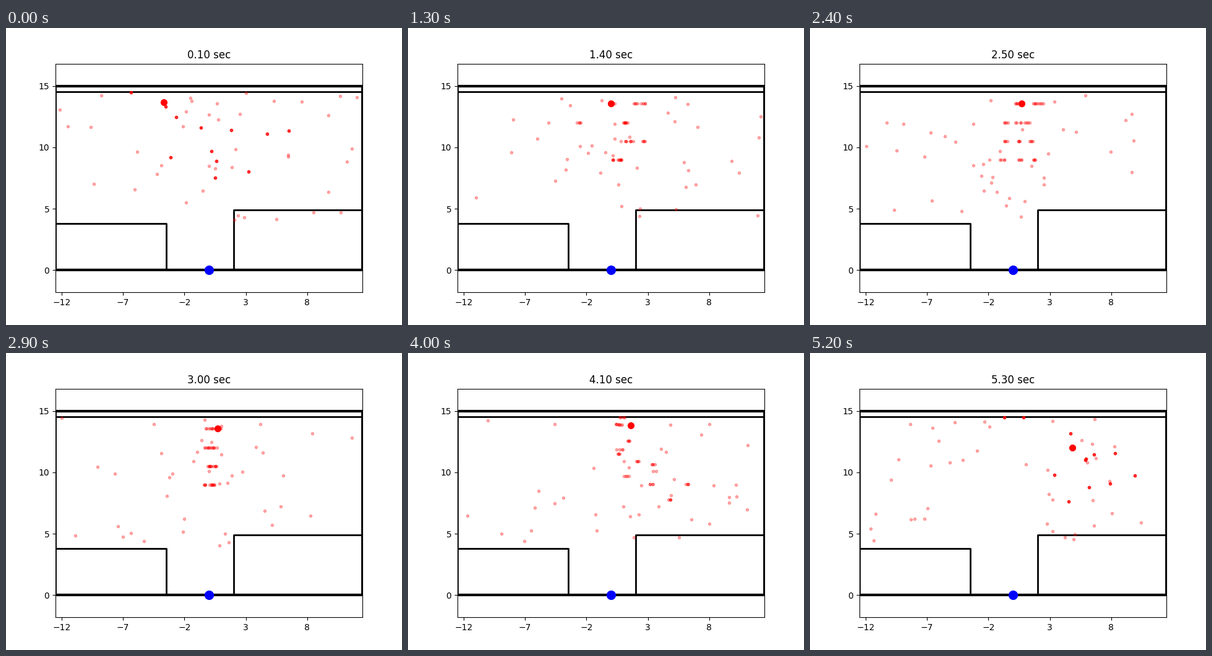
A matplotlib script that plays this animation: 640x480 px, repeating every 5300 ms.

```python
import matplotlib.pyplot as plt
import numpy as np
from matplotlib.animation import FuncAnimation

FRAMES, INTERVAL = 53, 100
X_MAX, Y_MIN, Y_MAX = 12.5, 4.0, 14.5
GROUPS, COPIES = 12, 4

# Waypoints: time, estimated position, centre and width of the particle groups
TIMES = [0.1, 0.9, 2.0, 3.0, 3.7, 4.5, 5.3]
EST_X = [-3.66, -0.59, 0.72, 0.72, -2.15, 5.35, 4.86]
EST_Y = [13.66, 13.55, 13.55, 13.55, 13.55, 14.05, 12.0]
FOCUS = [0, 0.2, 1.2, 0.3, -0.4, 6.5, 5]
WIDTH = [5, 0.7, 1.5, 0.8, 1.5, 3, 5]


def along(t, values):
    return np.interp(t, TIMES, values)


def clip(points):
    return np.clip(points, (-X_MAX, Y_MIN), (X_MAX, Y_MAX))


def particles_at(t, rng):
    focus, width = along(t, FOCUS), along(t, WIDTH)

    # Stacked copies on a few rows; wide clouds leave the rows and scatter less
    x = rng.normal(focus, width, GROUPS)
    rows = 13.55 - 1.52 * (np.arange(GROUPS) % 4)
    y = rows + rng.normal(0, 0.4 * width, GROUPS) * (width > 2)
    stacks = np.repeat(np.column_stack([x, y]), COPIES, axis=0)
    stacks[:, 0] += rng.normal(0, 0.12 * (width < 4), len(stacks))

    # Single particles, over the whole room and near the groups
    spread = rng.uniform((-X_MAX, Y_MIN), (X_MAX, Y_MAX), (30, 2))
    near = np.column_stack([rng.normal(focus, 1.8, 10),
                            rng.uniform(Y_MIN, Y_MAX, 10)])
    return clip(np.vstack([stacks, spread, near]))


fig, ax = plt.subplots(figsize=(6.4, 4.8), dpi=100)
half = 9.3145
ax.set(xlim=(-X_MAX, X_MAX), ylim=(7.5 - half, 7.5 + half),
       xticks=range(-12, 9, 5), yticks=range(0, 16, 5))


def wall(xs, ys, width=2):
    ax.plot(xs, ys, "k", lw=width)


for level in (0, 15):
    wall([-X_MAX, X_MAX], [level, level], 3)
wall([-X_MAX, X_MAX], [14.55, 14.55])
wall([-X_MAX, -X_MAX], [0, 15])
wall([12.45, 12.45], [0, 15])
wall([-X_MAX, -3.5, -3.5], [3.8, 3.8, 0])
wall([X_MAX, 2, 2], [4.9, 4.9, 0])

cloud, = ax.plot([], [], "ro", ms=3, alpha=0.3)
estimate, = ax.plot([], [], "ro", ms=7)
ax.plot([0], [0], "bo", ms=10)
title = ax.set_title("")


def update(i):
    t = (i + 1) / 10
    cloud.set_data(*particles_at(t, np.random.default_rng(i)).T)
    estimate.set_data([along(t, EST_X)], [along(t, EST_Y)])
    title.set_text(f"{t:.2f} sec")
    return cloud, estimate, title


anim = FuncAnimation(fig, update, frames=FRAMES, interval=INTERVAL, repeat=True)
plt.show()
```
